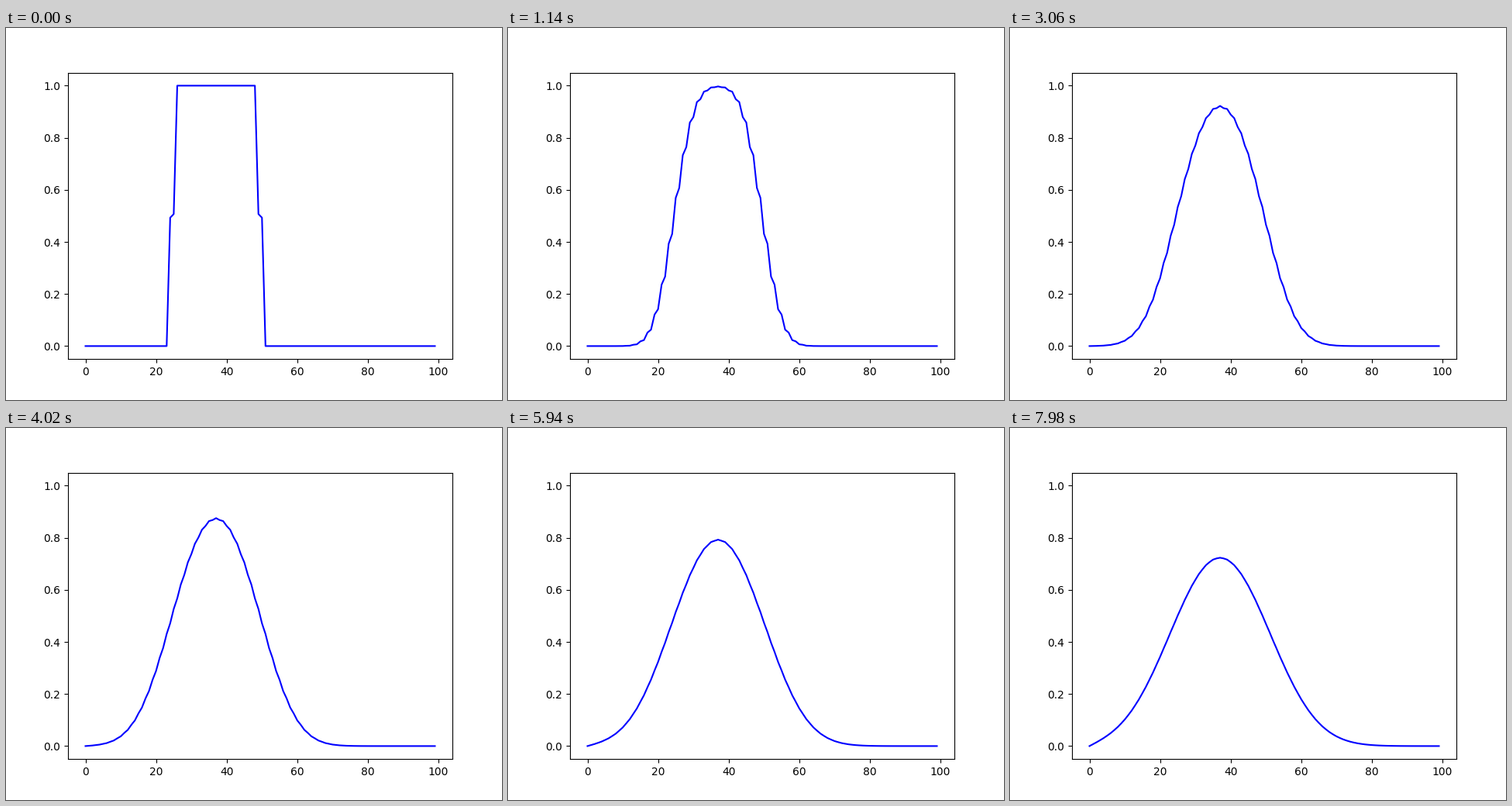
Recreate the animation shown at these times as a matplotlib script. Size 640 by 480 pixels, loop 8 s.

```python
import numpy as np
import matplotlib.pyplot as plt
from matplotlib.animation import FuncAnimation

N = 100          # grid points
R = 0.493        # diffusion number D*dt/dx^2
LOOP = 8000      # ms
TICK = 20        # ms per animation frame
HOLD = 3         # animation frames per time step


def diffuse(u):
    """One explicit step of the heat equation with fixed ends."""
    new = u.copy()
    new[1:-1] += R * (u[2:] - 2 * u[1:-1] + u[:-2])
    return new


frames = LOOP // TICK
u = np.zeros(N)
u[N // 4:N // 2] = 1.0
states = []
for _ in range((frames - 1) // HOLD + 1):
    u = diffuse(u)
    states.append(u)

fig, ax = plt.subplots(figsize=(6.4, 4.8), dpi=100)
line, = ax.plot(np.arange(N), states[0], "b-")
ax.set_xlim(-4.95, 103.95)
ax.set_ylim(-0.05, 1.05)


def update(i):
    line.set_ydata(states[i // HOLD])
    return line,


anim = FuncAnimation(fig, update, frames=frames, interval=TICK,
                     repeat=True, repeat_delay=0, blit=True)
plt.show()
```
